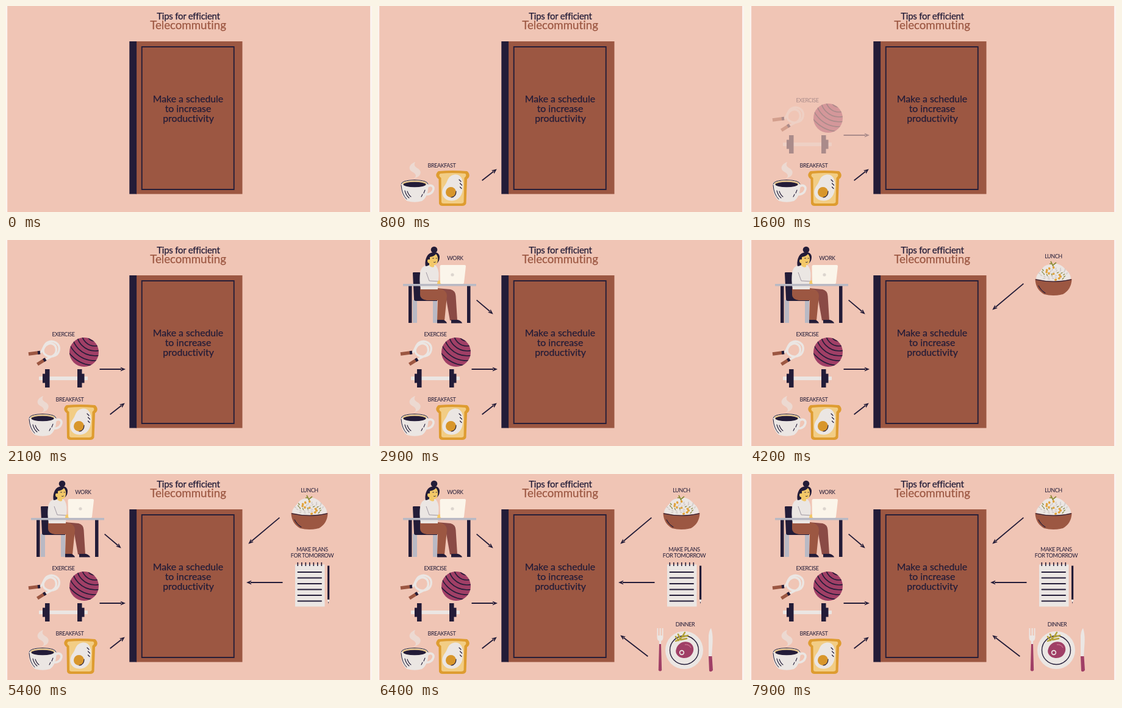
An HTML page for the animation above (8000 ms loop, 600x338 px).

```html
<!DOCTYPE html>
<html lang="en">
<head>
<meta charset="utf-8">
<style>
  html, body { margin: 0; width: 100%; height: 100%; overflow: hidden; background: #f0c5b5; }
  svg { display: block; width: 100vw; height: 100vh; }
  text { font-family: Lato, "Open Sans", sans-serif; font-variant-ligatures: none; text-anchor: middle; fill: #231c38; }
  .title { font-size: 15px; letter-spacing: -.25px; stroke: #231c38; stroke-width: .25; }
  .topic { font-size: 18.7px; fill: #9c5742; stroke: #9c5742; stroke-width: .25; }
  .label { font-size: 9px; letter-spacing: -.42px; }
  .note { font-size: 15.8px; stroke: #231c38; stroke-width: .25; }
  .dark { fill: #231c38; }
  .white { fill: #ebe6e3; }
  .brown { fill: #9c5742; }
  .plum { fill: #a03f66; }
  .skin { fill: #f3c868; }
  .line { fill: none; stroke: #231c38; stroke-linecap: round; }
  .step { opacity: 0; }
</style>
</head>
<body>
<svg viewBox="0 0 600 338">
  <defs>
    <clipPath id="ballClip"><circle cx="128" cy="184" r="24"/></clipPath>
  </defs>
  <rect width="600" height="338" fill="#f0c5b5"/>
  <path d="M0 0h2.2v338H0zM597 0h3v338h-3z" fill="#fbf3ef"/>

  <text class="title" x="299" y="21.5">Tips for efficient</text>
  <text class="topic" x="298.5" y="38">Telecommuting</text>

  <rect class="brown" x="213" y="58" width="174.5" height="250.5"/>
  <rect class="dark" x="202.3" y="58" width="11.8" height="250.5"/>
  <rect class="line" x="222.7" y="67" width="151" height="234" stroke-width="1.9"/>
  <text class="note" x="298.5" y="158">Make a schedule</text>
  <text class="note" x="298.5" y="174">to increase</text>
  <text class="note" x="299" y="190">productivity</text>

  <g class="step" data-arrow="171 286 194 268">
    <text class="label" x="104.500" y="264.5">BREAKFAST</text>
    <path d="M58 283C65 280 62 275 56 272C48 267 52 259 61 256C58 262 61 264 66 267C73 272 70 281 58 283Z" fill="#ecd9d1"/>
    <path d="M80 297C88 291 93 297 90 303C88 308 82 310 77 309" fill="none" stroke="#ebe6e3" stroke-width="3.6"/>
    <path class="white" d="M37.500 292C37 309 43 317 48 320Q60 323.500 72 320C78 316 83 308 82.500 292Z"/>
    <ellipse cx="60" cy="291.500" rx="22.500" ry="6.500" class="white"/>
    <path class="line" d="M38 292Q39 286 60 285.500Q81 286 82 292M38 294Q39 309 47 317" stroke-width="1"/>
    <ellipse cx="60" cy="291.500" rx="20" ry="5.200" fill="#e5c48c"/>
    <ellipse class="dark" cx="60" cy="293" rx="18.500" ry="4.200"/>
    <path class="line" d="M44 303Q46 311 51 315M48 304Q50 310 54 313M77 302L75 307M73 309L71 313" stroke-width="1.1"/>
    <path d="M99 271Q122 269 146 271C151 275 151 281 146 284L144.500 324Q143 328 138 328H106Q101 328 100 324L99.500 284C94 280 94 275 99 271Z" fill="#de9c30"/>
    <path d="M102 275Q122 273 143 275C145 277 145 279 141.500 282L140.500 322Q139.500 324 136.500 324H107.500Q104.500 324 104 322L103.500 282C99.500 279 100 277 102 275Z" fill="#f2cd85"/>
    <path class="white" d="M124 277C136 274 142 287 139 301C137 317 126 321 116 319C104 316 103 303 109 295C115 288 113 280 124 277Z"/>
    <circle cx="119.500" cy="305.500" r="8.500" fill="#d8962b"/>
    <path class="line" d="M128 304Q128 313 120 314M133 285l3 3M134.500 291l3 3M134.500 297l2.500 2.500" stroke-width="1.2"/>
  </g>

  <g class="step" data-arrow="154 212 195 212">
    <text class="label" x="94" y="157.500">EXERCISE</text>
    <path d="M55 185C61 184 61 171 68 168C78 163 89 170 87 181C85 192 70 194 63 187C57 179 66 169 75 170C84 172 85 185 77 190Q71 193 65 196" fill="none" stroke="#ebe6e3" stroke-width="3.400"/>
    <path d="M37 187L56 184.500M51.500 204L65 195.500" stroke="#9c5742" stroke-width="5.600"/>
    <path d="M52 185L56 184.500M61.500 197.700L65 195.500" stroke="#231c38" stroke-width="5.600"/>
    <circle class="plum" cx="128" cy="184" r="24"/>
    <g id="stripes" class="line" stroke-width="1.7" clip-path="url(#ballClip)"></g>
    <rect class="white" x="54" y="224" width="80" height="6" rx="1"/>
    <path class="dark" d="M60 219.500h5v15h-5zM64 212h7.500v30H64zM117 212h7.500v30H117zM123.500 219.500h5v15h-5z"/>
  </g>

  <g class="step" data-arrow="162 99 188 121">
    <text class="label" x="126.500" y="33">WORK</text>
    <path d="M57 98h7v38h-7zM90 98h7v38h-7z" fill="#b9b9c4"/>
    <path class="dark" d="M57 54Q57 53 59 53H68Q70 53 70 56L73 93H97V100H62Q59 100 59 97Z"/>
    <path d="M69 79Q83 76 96 79L119 81Q127 83 127.500 92L130 132H118L112 98L96 97Z" fill="#8a4a45"/>
    <path class="brown" d="M69 79L97 79Q113 81 113 92L109 132H97L98 99H80Q69 97 69 90Z"/>
    <path class="dark" d="M97 131H107Q112 133 113 136.500H97ZM120 131H131Q137 133 138 136.500H120Z"/>
    <path class="white" d="M80 41Q88 39 95 42Q100 48 99.500 59L98 81H70Q67 66 69.500 51Q72 43 80 41Z"/>
    <circle class="dark" cx="92" cy="16" r="5.300"/>
    <path class="dark" d="M78 43C76 36 79 23 87 21C95 18 101 22 101 28C101 33 99 36 97 38L84 41Q81 43 78 43Z"/>
    <path class="skin" d="M85 28Q92 27 95 23Q99 27 98 34Q97 41 92 41V44Q88 46 84 42V38Q81 38 81 34Q81 31 85 32Z"/>
    <path class="line" d="M89.500 30h2M95 30h1.500M91.500 36.500q2 1 3-.5" stroke-width=".9"/>
    <path d="M79 53L84 67L102 68" fill="none" stroke="#8b8290" stroke-width=".8"/>
    <path class="skin" d="M98 67Q105 65 108 69L106 72H97Z"/>
    <path class="dark" d="M50 75h5.500v61H50zM146 75h5.500v61H146z"/>
    <rect x="41" y="72" width="120" height="3.600" fill="#b9b9c4"/>
    <path d="M104 41H142Q144 41 144 43L141 70Q141 72 139 72H104Q102 72 102 70L101.500 43Q102 41 104 41Z" fill="#fbf5ea"/>
    <circle cx="122" cy="57" r="2.600" fill="#dcd5ce"/>
  </g>

  <g class="step" data-arrow="448 72 398 114">
    <text class="label" x="497.500" y="30">LUNCH</text>
    <path class="brown" d="M467.500 64Q468 81 482 89Q497 93 513 89Q527 81 527.500 64Z"/>
    <path class="white" d="M469 64C469 56 475 53 479 47C484 39 492 41 498 38.500C506 38 513 43 517 48C523 53 526 58 526 64Q498 71 469 64Z"/>
    <g id="rice"></g>
    <path d="M497 43L493 35M497 41L502 37M496 39L491 39" stroke="#8c8a35" stroke-width="1.700" fill="none"/>
    <path class="line" d="M468.500 65Q498 71.500 526.500 65M473 75Q477 83 484 87" stroke-width="1.100"/>
  </g>

  <g class="step" data-arrow="453 178 395 178">
    <text class="label" x="502" y="126.500">MAKE PLANS</text>
    <text class="label" x="502" y="136.500">FOR TOMORROW</text>
    <rect class="white" x="474" y="148.500" width="48.500" height="69"/>
    <path d="M477.500 148H521" stroke="#231c38" stroke-width="6" stroke-dasharray="1.6 4.9"/>
    <path class="line" d="M478.500 161H517M478.500 170.500H517M478.500 180H517M478.500 189.500H517M478.500 199H517M478.500 208.500H517" stroke-width="2"/>
    <path class="dark" d="M527 150.500h3.200v56h-3.200z"/>
    <path class="white" d="M527 206h3.200l-1.200 6h-.8z"/>
    <path class="dark" d="M528 210h1.200l-.6 3z"/>
  </g>

  <g class="step" data-arrow="442 299 398 265">
    <text class="label" x="503.500" y="250">DINNER</text>
    <circle class="white" cx="502" cy="289" r="31"/>
    <circle class="line" cx="502" cy="289" r="23.500" stroke-width="1.400"/>
    <path class="plum" d="M489 287C491 278 501 273 509 276C518 279 519 289 515 295C511 302 502 304 494 300C489 297 487 292 489 287Z"/>
    <circle cx="498" cy="293" r="4.200" fill="#ebe6e3"/>
    <circle class="plum" cx="498" cy="293" r="2.500"/>
    <path d="M503 280Q510 279 513 285" fill="none" stroke="#cb7590" stroke-width="1.300"/>
    <path d="M488 274Q496 273 503 260M493 273L488 267M496 271L492 263M496 272L506 270M500 267L508 265" fill="none" stroke="#b3a136" stroke-width="2.600" stroke-linecap="round"/>
    <path class="white" d="M457.500 253h1.800v12h2.400v-12h1.800v12h2.200v-12h1.800v15q0 5-3.500 6v6h-3v-6q-3.500-1-3.500-6zM542 300V265Q543 256 546 253Q550 264 548 285L547 300Z"/>
    <path class="plum" d="M461 279h3l1.200 43q-2.700 3-5.400 0zM542 299h5.500l1.500 23q-3.500 4-6 1z"/>
  </g>
</svg>
<script>
const NS = "http://www.w3.org/2000/svg";
const LOOP = 8000, FIRST = 500, GAP = 1000, FADE = 300;

function add(parent, tag, attrs) {
  const el = document.createElementNS(NS, tag);
  for (const key in attrs) el.setAttribute(key, attrs[key]);
  parent.append(el);
}

function arrow(group) {
  const [x1, y1, x2, y2] = group.dataset.arrow.split(" ").map(Number);
  const angle = Math.atan2(y2 - y1, x2 - x1) * 180 / Math.PI;
  const tip = Math.hypot(x2 - x1, y2 - y1) + 1;
  add(group, "path", {
    d: `M-.5-.9H${tip - 6}V.9H-.5ZM${tip} 0l-8.500-3.500 2 3.500-2 3.500z`,
    class: "dark", transform: `translate(${x1} ${y1}) rotate(${angle})`
  });
}

const steps = [...document.querySelectorAll(".step")];
steps.forEach(arrow);

const stripes = document.getElementById("stripes");
for (let r = 14; r < 56; r += 8)
  add(stripes, "circle", { cx: 146, cy: 152, r });

// Vegetables and grains scattered over the rice
const rice = document.getElementById("rice");
const colors = ["#e0a23a", "#8f9150", "#cfc8c5", "#cfc8c5"];
for (let i = 0; i < 40; i++) {
  const a = i * 2.4, d = Math.sqrt(i / 40);
  const x = 497.5 + 24 * d * Math.cos(a), y = 55.5 + 11 * d * Math.sin(a);
  add(rice, "ellipse", {
    cx: x, cy: y, rx: 2.1, ry: i % 4 ? .8 : 1.8,
    fill: colors[i % 4], transform: `rotate(${i * 67} ${x} ${y})`
  });
}

function draw(now) {
  const t = now % LOOP;
  steps.forEach((el, i) => {
    el.style.opacity = Math.min(1, Math.max(0, (t - FIRST - i * GAP) / FADE));
  });
  requestAnimationFrame(draw);
}
requestAnimationFrame(draw);
</script>
</body>
</html>
```
